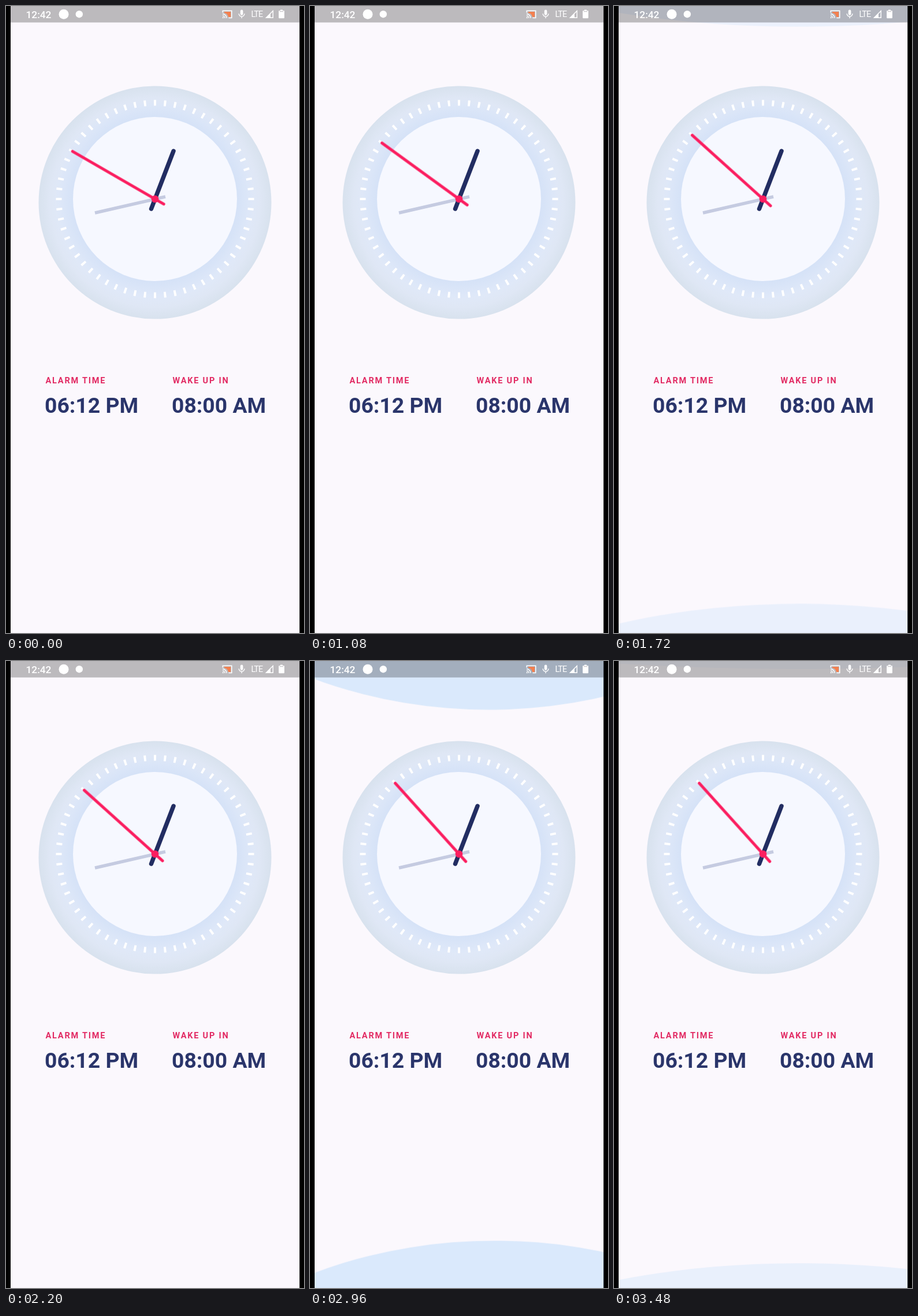
An HTML page for the animation above (3.52 s loop, 516 by 1085 pixels).

```html
<!DOCTYPE html>
<html lang="en">
<head>
<meta charset="utf-8">
<title>Alarm clock</title>
<style>
  html, body { margin: 0; width: 100%; height: 100%; overflow: hidden; background: #000; }
  svg { display: block; width: 516px; height: 1085px; font-family: Roboto, sans-serif; }

  .label { font-size: 14.5px; font-weight: 700; letter-spacing: 1.8px; fill: #e22a63; }
  .time { font-size: 37.3px; font-weight: 700; fill: #2a356b; }
  .status { fill: #fff; }

  .second {
    transform-origin: 258px 334px;
    animation: tick 3520ms step-end infinite;
  }
  @keyframes tick {
    0% { transform: rotate(300deg); }
    14.77% { transform: rotate(306deg); }
    43.18% { transform: rotate(312deg); }
    71.59%, 100% { transform: rotate(318deg); }
  }

  /* Overscroll glows: quick pull, then a decelerating recede */
  .glow { fill: #2196f3; animation: 3520ms linear infinite; }
  .top { transform-origin: 0 0; animation-name: pull-down; }
  .bottom { transform-origin: 0 1085px; animation-name: pull-up; }

  @keyframes pull-down {
    0%, 39.77% { transform: scaleY(0); opacity: 0; animation-timing-function: ease-out; }
    42.05% { transform: scaleY(.806); opacity: .115; }
    42.9% { transform: scaleY(.85); opacity: .16; animation-timing-function: cubic-bezier(.333, .667, .667, 1); }
    59.94% { transform: scaleY(0); opacity: 0; }
    81.25% { transform: translateX(-11px) scaleY(0); opacity: 0; animation-timing-function: ease-out; }
    84.09% { transform: translateX(-11px) scaleY(.836); opacity: .15; animation-timing-function: ease-out; }
    88.07% { transform: translateX(0) scaleY(1); opacity: .29; }
    90.91% { transform: scaleY(.697); opacity: .2; }
    93.75% { transform: scaleY(.444); opacity: .129; }
    96.59% { transform: scaleY(.25); opacity: .073; }
    98.86% { transform: scaleY(.135); opacity: .039; }
    100% { transform: scaleY(.09); opacity: .026; }
  }
  @keyframes pull-up {
    0%, 36.93% { transform: scaleY(0); opacity: 0; animation-timing-function: ease-out; }
    39.77% { transform: scaleY(.81); opacity: .13; }
    42.05% { transform: scaleY(.746); opacity: .12; }
    53.41% { transform: scaleY(.34); opacity: .05; }
    58.52% { transform: scaleY(.2); opacity: 0; }
    76.14% { transform: scaleY(0); opacity: 0; animation-timing-function: ease-out; }
    80.97% { transform: scaleY(.92); opacity: .17; }
    84.09% { transform: scaleY(.816); opacity: .15; }
    90.91% { transform: scaleY(.627); opacity: .12; }
    98.86% { transform: scaleY(.428); opacity: .08; }
    100% { transform: scaleY(.4); opacity: .075; }
  }
</style>
</head>
<body>
<svg viewBox="0 0 516 1085">
  <defs>
    <radialGradient id="rim" gradientUnits="userSpaceOnUse" cx="258" cy="340" r="201.5">
      <stop offset=".8" stop-color="#e0e9f9"/>
      <stop offset=".9" stop-color="#dfe7f5"/>
      <stop offset="1" stop-color="#d8e2ee"/>
    </radialGradient>
    <radialGradient id="shade" gradientUnits="userSpaceOnUse" cx="258" cy="334" r="172">
      <stop offset=".82" stop-color="#d5e2f7"/>
      <stop offset="1" stop-color="#d5e2f7" stop-opacity="0"/>
    </radialGradient>
  </defs>

  <rect x="8" width="500.5" height="1085" fill="#fbf8fd"/>

  <!-- Dial -->
  <circle cx="258" cy="340" r="201.5" fill="url(#rim)"/>
  <circle cx="258" cy="334" r="172" fill="url(#shade)"/>
  <circle cx="258" cy="334" r="166.5" fill="none" stroke="#fff" stroke-width="10"
          pathLength="360" stroke-dasharray="1.36 4.64" stroke-dashoffset=".68"/>
  <circle cx="258" cy="334" r="142" fill="#f6f8ff"/>

  <!-- Hands -->
  <path d="M154 358L276 330" stroke="#c5cbe1" stroke-width="5.5"/>
  <path d="M251.5 351L290 251" stroke="#222d62" stroke-width="7.5" stroke-linecap="round"/>
  <path class="second" d="M258 169V351.5" stroke="#fb1e60" stroke-width="5" stroke-linecap="round"/>
  <circle cx="258" cy="334" r="6.3" fill="#fb1e60"/>

  <text class="label" x="68.5" y="653">ALARM TIME</text>
  <text class="label" x="288.5" y="653">WAKE UP IN</text>
  <text class="time" x="67" y="703.5">06:12 PM</text>
  <text class="time" x="287" y="703.5">08:00 AM</text>

  <circle class="glow top" cx="320" cy="-649.5" r="750"/>
  <circle class="glow bottom" cx="320" cy="1734.5" r="750"/>

  <!-- Status bar -->
  <rect x="8" width="500.5" height="28.5" opacity=".25"/>
  <g class="status">
    <text x="34.5" y="21" font-size="17.3" font-weight="500">12:42</text>
    <circle cx="100" cy="14.2" r="8.5"/>
    <circle cx="126.8" cy="14.2" r="6.2"/>
    <path d="M378 10H389V19H385Q384 13 378 12Z" fill="#f4804f"/>
    <path d="M375.3 11.5V8.2H390.8V20.5H385.5M375 13.8A7 7 0 0 1 382 21M375 17A4 4 0 0 1 379 21"
          fill="none" stroke="#fff" stroke-width="1.5"/>
    <circle cx="375.8" cy="20.2" r="1.1"/>
    <rect x="405.8" y="6.5" width="4.6" height="9.4" rx="2.3"/>
    <path d="M403.2 13.2A4.9 4.9 0 0 0 413 13.2M408.1 18V21.2" fill="none" stroke="#fff" stroke-width="1.4"/>
    <text x="424.5" y="19.3" font-size="14.4" letter-spacing="-1">LTE</text>
    <path d="M450.5 20.3H462.3V8.5Z" fill="none" stroke="#fff" stroke-width="1.4"/>
    <path d="M449.5 21L458 12.5V21Z"/>
    <path d="M475 6.5H479V8H481Q482 8 482 9V20Q482 21.2 481 21.2H473.2Q472.2 21.2 472.2 20V9Q472.2 8 473.2 8H475Z"/>
    <path d="M473.8 9.6H480.4" stroke="#bcb9bd" stroke-width="1"/>
  </g>

  <!-- Bezel -->
  <path d="M0 0H8V1085H0ZM508.5 0H516V1085H508.5Z"/>
</svg>
</body>
</html>
```
